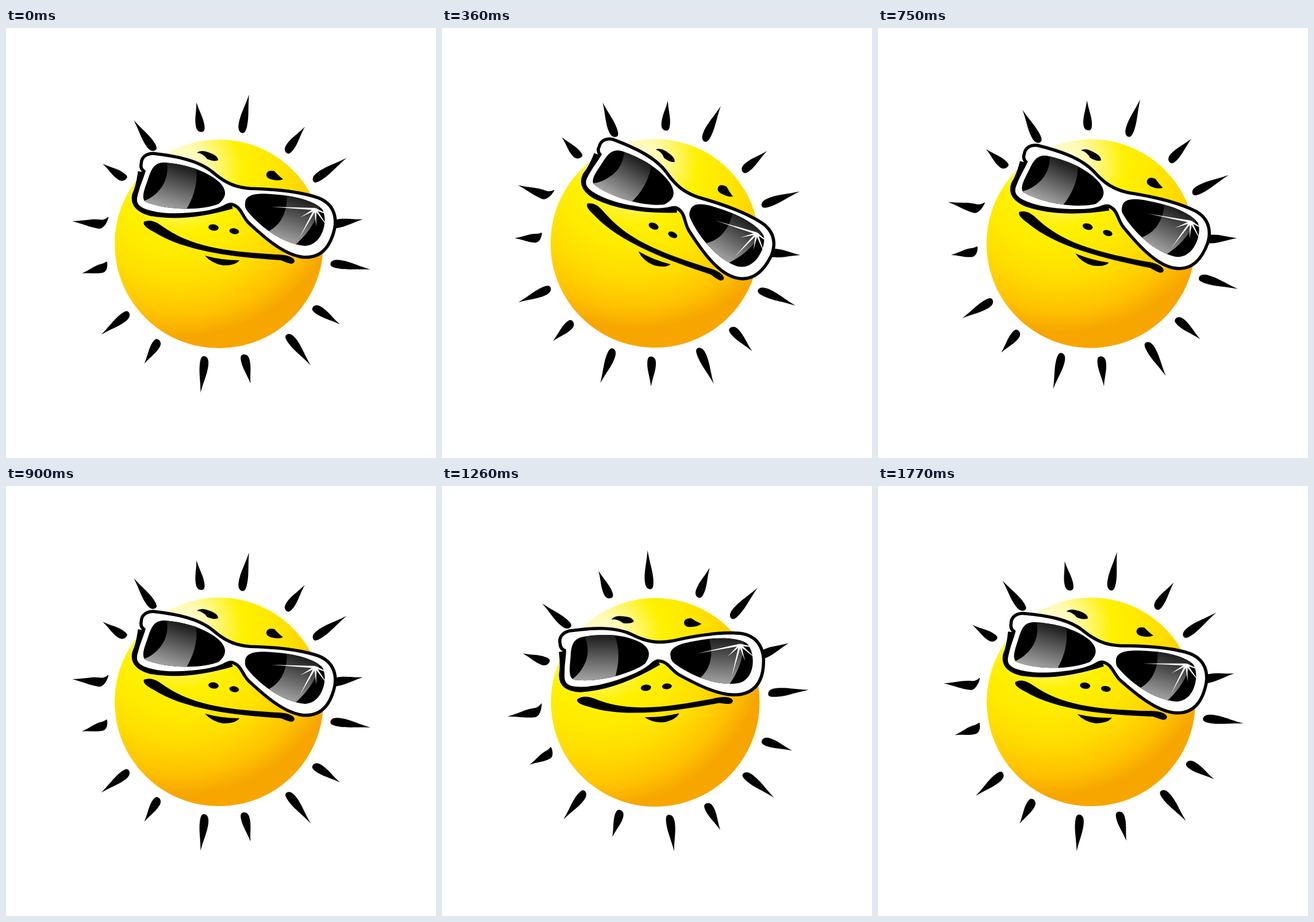
Recreate the animation shown at these times as an HTML page. Size 748x748 px, loop 1.8 s.

```html
<!DOCTYPE html>
<html lang="en">
<head>
<meta charset="utf-8">
<title>Rocking sun</title>
<style>
  html, body { margin: 0; width: 100%; height: 100%; overflow: hidden; background: #fff; }
  svg { display: block; width: 100%; height: 100%; }
</style>
</head>
<body>
<svg viewBox="0 0 748 748">
  <defs>
    <radialGradient id="skin" gradientUnits="userSpaceOnUse" cx="303" cy="246" r="300">
      <stop offset="0" stop-color="#fffde0"/>
      <stop offset=".15" stop-color="#fffab0"/>
      <stop offset=".36" stop-color="#fff100"/>
      <stop offset=".5" stop-color="#ffea00"/>
      <stop offset=".66" stop-color="#ffdd00"/>
      <stop offset=".84" stop-color="#ffc300"/>
      <stop offset=".97" stop-color="#f7a600"/>
    </radialGradient>
    <linearGradient id="glare" x1=".6" y1="0" x2=".3" y2="1">
      <stop offset=".1" stop-color="#222"/>
      <stop offset=".9" stop-color="#a4a4a4"/>
    </linearGradient>
    <path id="frame" d="M238 236C238 226 246 221 256 221C300 226 335 234 358 253C380 272 398 280 425 282
      C465 283 510 287 542 298C566 307 573 327 569 348C563 374 550 398 518 396C486 393 452 363 425 338
      C412 325 412 309 393 304C380 303 382 313 340 319C310 323 272 325 243 315C222 307 228 296 231 284
      C234 272 240 260 243 248Q236 244 238 236Z"/>
    <path id="lensLeft" d="M242 302C234 294 243 276 248 260C255 238 263 234 276 234C320 238 350 250 371 268
      C385 282 384 294 370 306C345 316 285 320 242 302Z"/>
    <path id="lensRight" d="M416 305C416 288 440 287 462 289C500 291 535 300 550 315
      C561 332 552 378 520 379C482 376 440 345 418 316Q415 311 416 305Z"/>
    <clipPath id="clipLeft"><use href="#lensLeft"/></clipPath>
    <clipPath id="clipRight"><use href="#lensRight"/></clipPath>
  </defs>
  <g id="sun">
    <g id="rays" transform="translate(370.5 375.5)"></g>
    <circle cx="370.5" cy="375.5" r="181.5" fill="url(#skin)"/>

    <path d="M240 337C255 331 266 341 278 349C330 384 395 389 470 394C489 394 502 399 502 406
      C499 414 489 408 478 404C400 399 310 389 256 354C243 347 238 342 240 337Z"/>
    <path d="M346 396Q376 404 406 404Q400 413 378 413Q358 410 346 396Z"/>
    <path d="M332 217Q340 211 354 217Q369 222 369 230Q362 233 350 228Q343 218 332 217Z"/>
    <path d="M453 254Q455 246 467 249Q474 257 482 263Q474 267 460 263Q452 260 453 254Z"/>
    <ellipse cx="361" cy="347" rx="9" ry="5.5" transform="rotate(8 361 347)"/>
    <ellipse cx="397" cy="353.5" rx="8.5" ry="5" transform="rotate(10 397 353.5)"/>

    <g fill="none" stroke="#000" stroke-width="11" stroke-linejoin="round">
      <use href="#frame"/>
      <path d="M235 250Q232 275 225 290Q220 312 250 321Q310 333 393 309"/>
    </g>
    <use href="#frame" fill="#fff"/>
    <use href="#lensLeft"/>
    <use href="#lensRight"/>
    <path clip-path="url(#clipLeft)" fill="url(#glare)"
      d="M279 230Q285 257 270 278Q257 295 240 301V320H311Q340 275 328 230Z"/>
    <path clip-path="url(#clipRight)" fill="url(#glare)"
      d="M488 288Q491 312 479 333Q471 346 456 354L480 382H497Q538 350 547 306Z"/>
    <g id="sparkle" fill="#fff" transform="translate(538 315)"></g>
  </g>
</svg>
<script>
const PERIOD = 1800, STEP = 30, SWING = 15, RAYS = 16;
const el = id => document.getElementById(id);
const wave = turns => Math.cos(2 * Math.PI * turns);

function addPath(parent, d, angle) {
  const path = document.createElementNS("http://www.w3.org/2000/svg", "path");
  path.setAttribute("d", d);
  path.setAttribute("transform", `rotate(${angle})`);
  parent.append(path);
}

// Long and short rays alternate; those on the left side curl like commas.
function addRay(i) {
  const odd = i % 2;
  const spread = wave((i - 0.5) / RAYS);
  const angle = 9.2 + i * 360 / RAYS + 2.4 * odd + 2.2 * spread;
  const tip = 263 - 14 * odd + 5 * wave((i - 3) / RAYS);
  const curl = Math.exp(-(((i - 11.7) / 0.8) ** 2));
  const y = t => 197 * t + tip * (1 - t);
  const left = -7.5 + 2 * curl, right = 7.5 + 3 * curl, base = 1.5 + 17 * curl;
  addPath(el("rays"), `M0 ${-tip}
    C${left * .4} ${-y(.35)} ${left} ${-y(.5)} ${left} ${-y(.77)}
    C${left} ${-y(.93)} ${base - 5} ${-y(1)} ${base} ${-y(1)}
    C${base + 4} ${-y(1)} ${right} ${-y(.95)} ${right} ${-y(.77)}
    C${right} ${-y(.55)} ${right * .4} ${-y(.35)} 0 ${-tip}Z`, angle);
}

function addSpike(i) {
  const length = i % 2 ? 30 : 76 - 9 * i;
  addPath(el("sparkle"), `M0 -1.9L${length} 0L0 1.9Z`, 183 - 32 * i);
}

for (let i = 0; i < RAYS; i++) addRay(i);
for (let i = 0; i < 6; i++) addSpike(i);

const sun = el("sun"), start = performance.now();

function draw() {
  const elapsed = (performance.now() - start) % PERIOD;
  const time = Math.floor(elapsed / STEP) * STEP;
  const angle = SWING * Math.sin(2 * Math.PI * time / PERIOD);
  sun.setAttribute("transform", `rotate(${angle} 374 374)`);
  requestAnimationFrame(draw);
}
draw();
</script>
</body>
</html>
```
